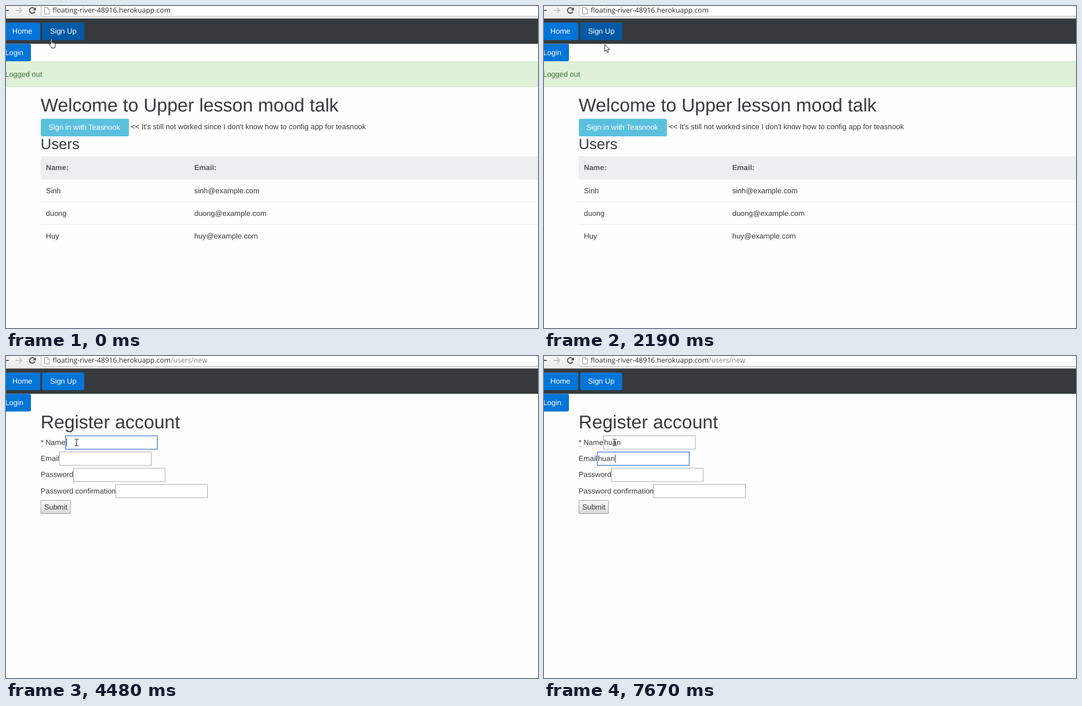
Write an HTML page that moves like this. It is 960 by 583 pixels and loops after 8 s.

```html
<!DOCTYPE html>
<html lang="en">
<head>
<meta charset="utf-8">
<title>Sign up walkthrough</title>
<style>
  html, body { margin: 0; width: 100%; height: 100%; overflow: hidden; background: #fefefe; }
  svg { display: block; width: 100%; height: 100%; }
  text { font: 13.4px "Liberation Sans", Arial, sans-serif; fill: #373a3c; text-rendering: geometricPrecision; white-space: pre; }
  .h1 { font-size: 33.5px; }
  .h2 { font-size: 26.8px; }
  .light { fill: #fff; }
  .alert { fill: #3c763d; }
  .th { font-weight: bold; fill: #55595c; }
  .url { font: 12.68px "Open Sans", "Noto Sans", sans-serif; fill: #2b2b2b; }
  .path { fill: #858585; }
</style>
</head>
<body>
<svg id="stage" viewBox="0 0 960 583">
  <defs>
    <linearGradient id="bar" x2="0" y2="1"><stop stop-color="#f7f7f7"/><stop offset="1" stop-color="#ebebeb"/></linearGradient>
    <linearGradient id="grey" x2="0" y2="1"><stop stop-color="#f8f8f8"/><stop offset=".45" stop-color="#ececec"/><stop offset="1" stop-color="#d5d5d5"/></linearGradient>
  </defs>
  <g id="chrome"></g>
  <g id="nav"></g>
  <g id="home"></g>
  <g id="register"></g>
  <g id="cursor" stroke-linejoin="round" stroke-linecap="round">
    <g id="hand" fill="#fff" stroke="#111">
      <path d="M3.5 10V1.8Q3.5.6 4.7.6 5.9.6 5.9 1.8V6.5Q7.8 6 8 7 9.8 6.6 10.1 7.7 12.2 7.4 12.2 9.2V12Q12.2 13.5 11.2 15V17H4.6V15.2Q3 13.5.8 10.4.4 9 1.6 8.8 2.6 9 3.5 10Z"/>
      <path d="M5.9 6.5V9M8 7V9.3M10.1 7.7V9.6" stroke-width=".8"/>
    </g>
    <path id="arrow" d="M.6.8V13L3.4 10.4 5.4 14.9 7.4 14 5.5 9.7H9.4Z" fill="#fff" stroke="#222"/>
    <path id="beam" d="M-3 .5H-1Q0 .5 0 1.5V11.5Q0 12.5-1 12.5H-3M3 .5H1Q0 .5 0 1.5M0 11.5Q0 12.5 1 12.5H3" fill="none" stroke="#111"/>
  </g>
</svg>
<script>
const LOOP = 8000;
const byId = id => document.getElementById(id);

function add(parent, tag, attrs, content) {
  const el = document.createElementNS("http://www.w3.org/2000/svg", tag);
  for (const key in attrs) el.setAttribute(key, attrs[key]);
  if (content !== undefined) el.textContent = content;
  parent.appendChild(el);
  return el;
}
const rect = (parent, x, y, width, height, fill, more) =>
  add(parent, "rect", { x, y, width, height, fill, ...more });
const text = (parent, x, y, content, cls = "") =>
  add(parent, "text", { x, y, class: cls }, content);
const line = (parent, d, stroke, width = 1) =>
  add(parent, "path", { d, stroke, fill: "none", "stroke-width": width });

function button(parent, x, y, right, label, textX, fill) {
  const box = rect(parent, x, y, right - x, 31.8, fill, { rx: 3.3 });
  text(parent, textX, y + 20.2, label, "light");
  return box;
}

// Browser bar
const chrome = byId("chrome");
rect(chrome, 0, 0, 960, 23, "url(#bar)");
rect(chrome, 63.5, -6.5, 910, 25, "#fff", { stroke: "#bdbdbd", rx: 2.5 });
line(chrome, "M0 22.5H960", "#b4b4b4");
line(chrome, "M-2 8H5", "#5a5a5a", 2);
line(chrome, "M17 8H28M23.5 3L28.5 8L23.5 13", "#c6c6c6", 2);
line(chrome, "M51.6 5.2A5 5 0 1 0 52 10", "#555", 2.1);
add(chrome, "path", { d: "M54 2.2V8H48.2Z", fill: "#555" });
add(chrome, "path", { d: "M69.5 2.5H75L78.5 6V14.5H69.5ZM75 2.5V6H78.5", fill: "#fff", stroke: "#8c8c8c" });
text(chrome, 84.3, 12.4, "floating-river-48916.herokuapp.com", "url");
const urlPath = text(chrome, 297.3, 12.4, "/users/new", "url path");

// Navigation
const nav = byId("nav");
rect(nav, 0, 23, 960, 45.5, "#373a3c");
button(nav, -6, 30, 61.8, "Home", 11.6, "#0275d8");
const signUp = button(nav, 65.2, 30, 141.1, "Sign Up", 79.5, "#0275d8");
button(nav, -6, 68.6, 45, "Login", -1.6, "#0275d8");

// Home page
const home = byId("home");
rect(home, -5, 100.5, 970, 46, "#dff0d8", { stroke: "#d0e9c6" });
text(home, -1.8, 128, "Logged out", "alert");
text(home, 62.6, 191, "Welcome to Upper lesson mood talk", "h1");
button(home, 62.8, 204.2, 221.8, "Sign in with Teasnook", 76.6, "#5bc0de");
text(home, 225.3, 223.2, "<< It's still not worked since I don't know how to config app for teasnook");
text(home, 62.6, 259.2, "Users", "h2");
rect(home, 62.6, 272, 900, 42.5, "#eceeef");
text(home, 72, 297.2, "Name:", "th");
text(home, 339.7, 297.2, "Email:", "th");
["Sinh", "duong", "Huy"].forEach((name, i) => {
  const y = 339 + i * 41;
  text(home, 72, y, name);
  text(home, 339.7, y, name.toLowerCase() + "@example.com");
  if (i) line(home, `M62.6 ${y - 25.5}H960`, "#eceeef");
});

// Registration form
const register = byId("register");
text(register, 62.6, 131, "Register account", "h1");
text(register, 62.6, 161, "*");
line(register, "M62.6 163.5H68", "#888").setAttribute("stroke-dasharray", "1 1");
const labels = [["Name", 71.2, 107], ["Email", 62.6, 96], ["Password", 62.6, 121], ["Password confirmation", 62.6, 197.4]];
const fields = labels.map(([label, x, left], i) => {
  const top = 144 + i * 29.3;
  text(register, x, top + 16.8, label);
  return {
    left,
    box: rect(register, left + .5, top + .5, 165.6, 24.2, "#fff", { stroke: "#a9a9a9" }),
    value: text(register, left + 1.6, top + 16.8, ""),
    caret: rect(register, 0, top + 5.2, 1, 14.6, "#333")
  };
});
rect(register, 63, 261.5, 53.6, 24, "url(#grey)", { stroke: "#a0a0a0", rx: 1 });
text(register, 69, 278, "Submit");

// Timelines of held values: [start, ...values]
const word = "huan";
const pointer = [
  [0, "hand", 77, 59], [120, "hand", 80, 56.5], [250, "hand", 82.7, 54],
  // hotspot glides off the button
  ...Array.from({ length: 6 }, (_, i) => {
    const k = (i + 1) / 6, x = 87.5 + 9.5 * k, y = 54 + 10 * k;
    return y < 62 ? [1300 + 124 * i, "hand", x - 4.8, y] : [1300 + 124 * i, "arrow", x, y];
  }),
  [2070, "arrow", 103, 67], [2190, "arrow", 109, 69.3], [2340, "arrow", 119, 74],
  [2490, "arrow", 122, 75], [2740, "arrow", 122.5, 84], [2860, "arrow", 123.3, 104],
  [2980, "arrow", 124.3, 126], [3100, "arrow", 125, 140], [3250, "beam", 127.5, 150]
];
const signUpFill = [[0, "#025aa5"], [390, "#014682"], [590, "#025094"], [710, "#025aa5"], [2340, "#0275d8"]];
// focused field, letters typed, caret shown
const typing = [
  [0, -1, 0, 0], [3500, 0, 0, 1], [4020, 0, 0, 0], [4480, 0, 0, 1], [5110, 0, 0, 0],
  [5230, 0, 1, 1], [5510, 0, 2, 1], [5660, 0, 3, 1], [5810, 0, 4, 1], [6310, 0, 4, 0],
  [6810, 1, 0, 1], [7120, 1, 1, 1], [7270, 1, 2, 1], [7400, 1, 3, 1], [7670, 1, 4, 1]
];
const at = (keys, t) => keys.filter(k => k[0] <= t).pop().slice(1);
const show = (el, on) => el.setAttribute("display", on ? "inline" : "none");

function draw(t) {
  const onForm = t >= 2340;
  show(home, !onForm);
  show(register, onForm);
  show(urlPath, onForm);
  signUp.setAttribute("fill", at(signUpFill, t)[0]);

  const [focus, count, caretOn] = at(typing, t);
  fields.forEach((field, i) => {
    const active = i === focus;
    const length = i < focus ? word.length : active ? count : 0;
    field.value.textContent = word.slice(0, length);
    field.box.setAttribute("stroke", active ? "#5a92dc" : "#a9a9a9");
    field.box.setAttribute("stroke-width", active ? 1.6 : 1);
    field.caret.setAttribute("x", Math.round(field.left + 1.8 + length * 7.45));
    show(field.caret, active && caretOn);
  });

  const [kind, x, y] = at(pointer, t);
  for (const id of ["hand", "arrow", "beam"]) show(byId(id), id === kind);
  byId("cursor").setAttribute("transform", `translate(${x} ${y})`);
}

const start = performance.now();
function tick() {
  draw((performance.now() - start) % LOOP);
  requestAnimationFrame(tick);
}
tick();
</script>
</body>
</html>
```
